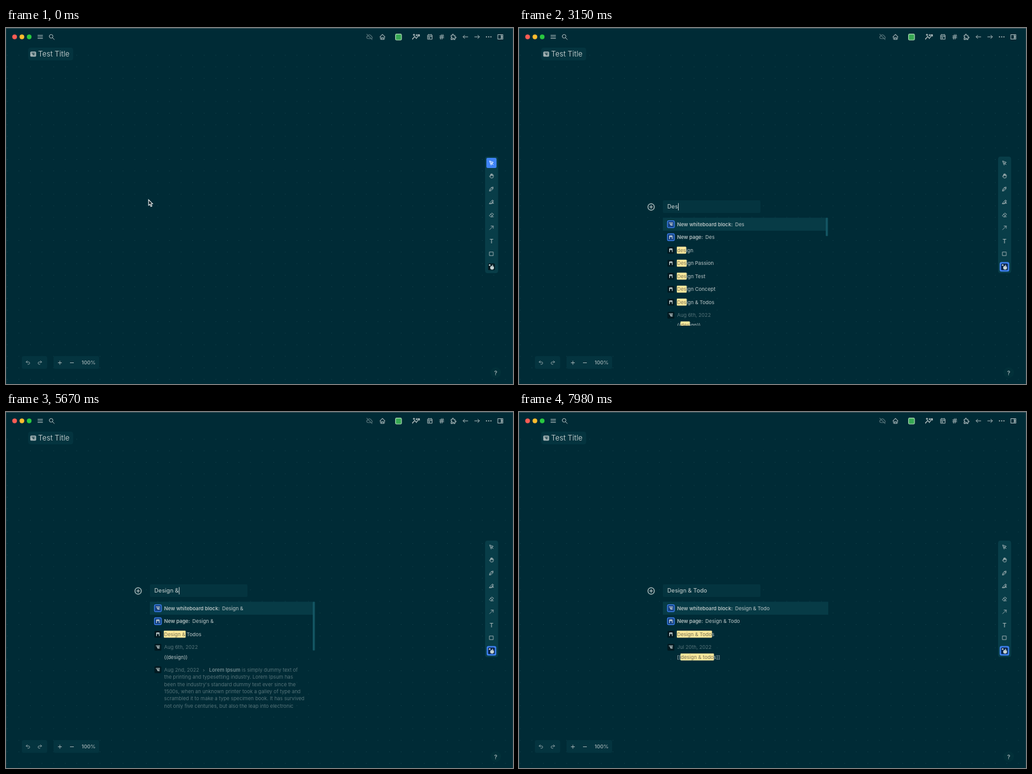
These frames come from a looping animation (800x562 px, 8000 ms). An HTML page with a canvas:

```html
<!DOCTYPE html>
<html lang="en">
<head>
<meta charset="utf-8">
<title>Whiteboard search</title>
<style>
  html, body { margin: 0; width: 100%; height: 100%; overflow: hidden; background: #002b36; }
  canvas { display: block; width: 800px; height: 562px; }
</style>
</head>
<body>
<canvas id="stage"></canvas>
<script>
const LOOP = 8000, TOOL_AT = 700, SEARCH_AT = 1260;
// Moment at which each character of the query is typed
const QUERY = 'Design & Todo';
const KEYS = [2450, 2730, 3010, 3500, 3920, 4340, 5110, 5600, 5880, 6230, 6720, 7000, 7350];

const BG = '#002b36', PANEL = '#04343f', ACTIVE = '#073b46', TOOLBAR = '#083d48';
const TEXT = '#a4b3b5', BRIGHT = '#b4c0c1', DIM = '#557379', BLUE = '#3f83f4', DARK = '#001920';
const MARK = '#fde99d', MARK_TEXT = '#87835d';

const canvas = document.getElementById('stage');
const ctx = canvas.getContext('2d');
const ratio = window.devicePixelRatio || 1;
canvas.width = 800 * ratio;
canvas.height = 562 * ratio;

// Icons on a 24 unit grid
const ICONS = {
  menu: 'M3 6h18M3 12h18M3 18h18',
  search: 'M3 10a7 7 0 1 0 14 0a7 7 0 1 0-14 0M22 22l-7-7',
  offline: 'M9.6 5.2a7 7 0 0 1 9 5.3a4 4 0 0 1 2 6.6M18 18H7a4.5 4.5 0 0 1 0-9M3 3l18 18',
  home: 'M5 12H3l9-9 9 9h-2M5 12v7a2 2 0 0 0 2 2h10a2 2 0 0 0 2-2v-7M9 21v-6h6v6',
  chart: 'M2 18l6-7 5 5 8-9M18 6h4v4M2 17v2M8 10v2M13 15v2M6 4v4M4 6h4M14 5v4M12 7h4',
  calendar: 'M4 5h16v16H4zM8 2v5M16 2v5M4 11h16M8 15h3v2H8z',
  hash: 'M4 9h16M4 15h16M11 3L7 21M17 3l-4 18',
  puzzle: 'M4 7h3a1 1 0 0 0 1-1V5a2 2 0 0 1 4 0v1a1 1 0 0 0 1 1h4v5h2a2 2 0 0 1 0 4h-2v5h-4v-2a2 2 0 0 0-4 0v2H4v-5h1a2 2 0 0 0 0-4H4z',
  left: 'M21 12H3l6-6M3 12l6 6',
  right: 'M3 12h18l-6-6M21 12l-6 6',
  sidebar: 'M3 4h18v16H3zM15 4v16M18 8v8',
  select: 'M5 4l15 6-6 3-3 7zM13 13l6 6M10 10l1 3',
  hand: 'M8 13V6a1.5 1.5 0 0 1 3 0v5V4a1.5 1.5 0 0 1 3 0v7V6a1.5 1.5 0 0 1 3 0v6V9a1.5 1.5 0 0 1 3 0v6a6 6 0 0 1-6 6h-2c-4 0-6-4-8-7c-1-2 1-3 2-2z',
  pencil: 'M4 20l1-7 7-7 7-2-1 8-7 7zM4 20l8-8M12 6l6 6',
  highlighter: 'M3 20h9M5 16l9-9 4 4-8 8H5zM14 18h7l-3-4zM14 7l2-3 5 4-3 3',
  eraser: 'M8 20l-5-5L14 4l7 6-10 10zM8 9l8 7M11 20h9',
  connector: 'M4 20L20 4M10 4h10v10',
  box: 'M4 4h16v16H4z',
  undo: 'M9 13L4 8l5-5M4 8h11a5 5 0 0 1 0 11h-3',
  redo: 'M15 13l5-5-5-5M20 8H9a5 5 0 0 0 0 11h3',
  plus: 'M12 4v16M4 12h16',
  minus: 'M4 12h16',
  addCircle: 'M1 12a11 11 0 1 0 22 0a11 11 0 1 0-22 0M12 7v10M7 12h10',
  block: 'M3 5h18M7 11h13M12 17h8M12 11v6',
  page: 'M5 20V5h14v15M9 5v5h6V5',
  findPage: 'M20 10V4H4v16h7M12 15a3 3 0 1 0 6 0a3 3 0 1 0-6 0M17 17l4 4'
};
for (const name in ICONS) ICONS[name] = new Path2D(ICONS[name]);

function icon(name, x, y, size = 10, color = TEXT, weight = 2.4) {
  ctx.save();
  ctx.translate(x - size / 2, y - size / 2);
  ctx.scale(size / 24, size / 24);
  ctx.strokeStyle = color;
  ctx.lineWidth = weight;
  ctx.lineCap = ctx.lineJoin = 'round';
  ctx.stroke(ICONS[name]);
  ctx.restore();
}

function rect(x, y, w, h, fill, radius = 0, stroke) {
  ctx.beginPath();
  ctx.roundRect(x, y, w, h, radius);
  ctx.fillStyle = fill;
  ctx.fill();
  if (stroke) {
    ctx.strokeStyle = stroke;
    ctx.lineWidth = 1.2;
    ctx.stroke();
  }
}

function dot(x, y, r, fill) {
  ctx.beginPath();
  ctx.arc(x, y, r, 0, 7);
  ctx.fillStyle = fill;
  ctx.fill();
}

// Draws text centred on y and returns its right edge
function text(value, x, y, { size = 7.9, weight = 500, color = TEXT } = {}) {
  ctx.font = `${weight} ${size}px Inter, sans-serif`;
  ctx.fillStyle = color;
  ctx.fillText(value, x, y + size * 0.36);
  return x + ctx.measureText(value).width;
}

function markedText(value, match, x, y) {
  const at = value.toLowerCase().indexOf(match.toLowerCase());
  if (at < 0) return text(value, x, y);
  const end = at + match.length;
  const start = text(value.slice(0, at), x, y);
  const width = ctx.measureText(value.slice(at, end)).width;
  rect(start - 0.5, y - 5.5, width + 1, 11, MARK, 1);
  text(value.slice(at, end), start, y, { color: MARK_TEXT });
  text(value.slice(end), start + width, y);
}

function drawBoard() {
  rect(0, 0, 800, 562, BG);
  for (let y = 43; y < 560; y += 18.28)
    for (let x = 2; x < 800; x += 18.28) rect(x - 0.5, y - 0.5, 1, 1, '#15454f');
  rect(0, 0, 800, 1, '#3a555d');
  rect(0, 1, 0.6, 561, '#1c424c');
  rect(799.4, 1, 0.6, 561, '#1c424c');
}

function drawHeader() {
  ['#ff5c54', '#fdbc2e', '#29c840'].forEach((color, i) => dot(13.6 + i * 11.5, 14, 3.7, color));
  icon('menu', 54, 14);
  icon('search', 72, 14);
  icon('offline', 573.5, 14, 11, DIM);
  icon('home', 594, 14, 10.5);
  rect(614.7, 9.7, 9.3, 9.3, '#36a852', 1.5, '#a5d3ae');
  icon('chart', 647, 14, 13);
  icon('calendar', 669, 14);
  icon('hash', 687.5, 14);
  icon('puzzle', 706, 14, 11);
  icon('left', 725, 14);
  icon('right', 743.3, 14);
  [758.2, 761.7, 765.2].forEach(x => dot(x, 14, 1, TEXT));
  icon('sidebar', 780, 14, 10.5);

  rect(35, 31, 71, 20, PANEL, 4);
  rect(38.3, 37.2, 9.2, 8, TEXT, 1.5);
  icon('block', 43, 41.2, 6, BG, 3);
  text('Test Title', 50.8, 41, { size: 11.4, weight: 400, color: BRIGHT });
}

function drawFooter() {
  rect(25, 518, 40, 20, PANEL, 3);
  rect(75, 518, 72, 20, PANEL, 3);
  icon('undo', 34.5, 528.5, 8);
  icon('redo', 53.5, 528.5, 8);
  icon('plus', 85, 528.5, 8, TEXT, 2.8);
  icon('minus', 104, 528.5, 8, TEXT, 2.8);
  text('100%', 119.3, 528.5, { size: 8.2 });
  dot(772.8, 544, 8.5, '#023039');
  text('?', 770.2, 544.3, { size: 9, weight: 600 });
}

function drawToolbar(searching) {
  rect(756, 203, 20.5, 184, TOOLBAR, 4);
  const tools = ['select', 'hand', 'pencil', 'highlighter', 'eraser', 'connector', 'letter', 'box'];
  if (!searching) rect(758, 205, 16, 16, BLUE, 2);
  tools.forEach((name, i) => {
    const y = 213 + i * 20.5;
    if (name === 'letter') text('T', 763.1, y + 0.2, { size: 9.5 });
    else icon(name, 766, y, name === 'box' || name === 'connector' ? 8.5 : 9, i || searching ? TEXT : '#fff');
  });
  if (searching) rect(758.5, 369.5, 15, 15, BLUE, 2.5);
  rect(760.7, 371.7, 10.6, 10.6, searching ? '#06234b' : DARK, 1.5);
  dot(763.2, 374.3, 1.3, '#c5d2d3');
  dot(767, 378.5, 3, '#c5d2d3');
  dot(767.8, 374.6, 0.9, '#c5d2d3');
}

function drawPointer() {
  ctx.beginPath();
  [[225, 271], [225, 280], [227.1, 278.4], [228.7, 281.7], [230.3, 281], [228.8, 277.8], [231.4, 277.5]]
    .forEach(([x, y]) => ctx.lineTo(x, y));
  ctx.closePath();
  ctx.fillStyle = '#0a1a1f';
  ctx.fill();
  ctx.strokeStyle = '#e4e9e9';
  ctx.lineWidth = 1.1;
  ctx.stroke();
}

const BLURB = [
  'the printing and typesetting industry. Lorem Ipsum has',
  "been the industry's standard dummy text ever since the",
  '1500s, when an unknown printer took a galley of type and',
  'scrambled it to make a type specimen book. It has survived',
  'not only five centuries, but also the leap into electronic'
];

function resultsFor(query) {
  if (!query) return [
    { kind: 'block', create: 'New whiteboard block' },
    { kind: 'block', label: 'Search only blocks' },
    { kind: 'findPage', label: 'Search only pages' }
  ];
  const term = query.trim().toLowerCase();
  const pages = ['design', 'Design Passion', 'Design Test', 'Design Concept', 'Design & Todos'];
  const rows = [{ kind: 'block', create: 'New whiteboard block:', value: query }];
  if (!pages.some(page => page.toLowerCase() === term))
    rows.push({ kind: 'page', create: 'New page:', value: query });
  for (const page of pages)
    if (page.toLowerCase().startsWith(term)) rows.push({ kind: 'page', label: page });
  if (query.length > 10) rows.push({ kind: 'block', date: 'Jul 20th, 2022', content: '[[design & todos]]' });
  else rows.push(
    { kind: 'block', date: 'Aug 6th, 2022', content: '((design))' },
    { kind: 'block', date: 'Aug 2nd, 2022', blurb: true });
  return rows;
}

function thumbHeight(length) {
  if (!length || length > 10) return 0;
  return length < 3 ? 18 + 5 * length : length < 6 ? 29 + (length - 3) * 11 : length < 8 ? 61 : 77;
}

function drawRow(row, y, term) {
  const x = 249.5;
  rect(234.3, y - 5.4, 10.8, 10.8, row.create ? '#14407f' : DARK, 1.5, row.create && BLUE);
  icon(row.kind, 239.7, y, 7.5, '#d5dddd', 3.2);
  if (row.create) {
    const end = text(row.create, x, y, { weight: 600, color: BRIGHT });
    if (row.value) text(row.value, end + 3.8, y);
  } else if (row.label) {
    if (term) markedText(row.label, term, x, y);
    else text(row.label, x, y);
  } else {
    const faint = { weight: 400, color: DIM };
    const end = text(row.date, x, y, faint);
    if (row.content) markedText(row.content, term, x, y + 15.5);
    if (row.blurb) {
      text('›', end + 5.5, y, faint);
      const boldEnd = text('Lorem Ipsum', 320.5, y, { weight: 600, color: '#6d878c' });
      text(' is simply dummy text of', boldEnd, y, faint);
      BLURB.forEach((line, i) => text(line, x, y + 11.4 * (i + 1), faint));
    }
  }
}

function drawSearch(time, query) {
  dot(208.5, 282.5, 7.5, '#03313b');
  icon('addCircle', 208.5, 282.5, 11, BRIGHT, 2.6);
  rect(227, 272, 154, 20, PANEL, 2);
  const end = text(query || 'Create or search your graph...', 234, 282.2,
    { size: 9.1, weight: query ? 500 : 400, color: query ? BRIGHT : '#93a6a8' });
  const typedAt = query ? KEYS[query.length - 1] : SEARCH_AT;
  if ((time - typedAt) % 1000 < 500) rect((query ? end : 233.6) + 0.2, 276.5, 0.9, 11.5, '#d0d9d9');

  ctx.save();
  ctx.beginPath();
  ctx.rect(220, 299, 275, 171);
  ctx.clip();
  const thumb = thumbHeight(query.length);
  rect(227, 299.5, thumb ? 257 : 261, 20.5, ACTIVE);
  if (thumb) rect(484, 299.5, 3.4, thumb, '#135562', 1);
  let y = 309.8;
  for (const row of resultsFor(query)) {
    drawRow(row, y, query.trim());
    y += row.date ? 35.6 : 20.5;
  }
  ctx.restore();
}

function draw(now) {
  const time = now % LOOP;
  const query = QUERY.slice(0, KEYS.filter(key => key <= time).length);
  ctx.setTransform(ratio, 0, 0, ratio, 0, 0);
  drawBoard();
  drawHeader();
  drawFooter();
  drawToolbar(time >= TOOL_AT);
  if (time >= SEARCH_AT) drawSearch(time, query);
  if (!query) drawPointer();
}

const start = performance.now();
function tick() {
  draw(performance.now() - start);
  requestAnimationFrame(tick);
}
tick();
</script>
</body>
</html>
```
